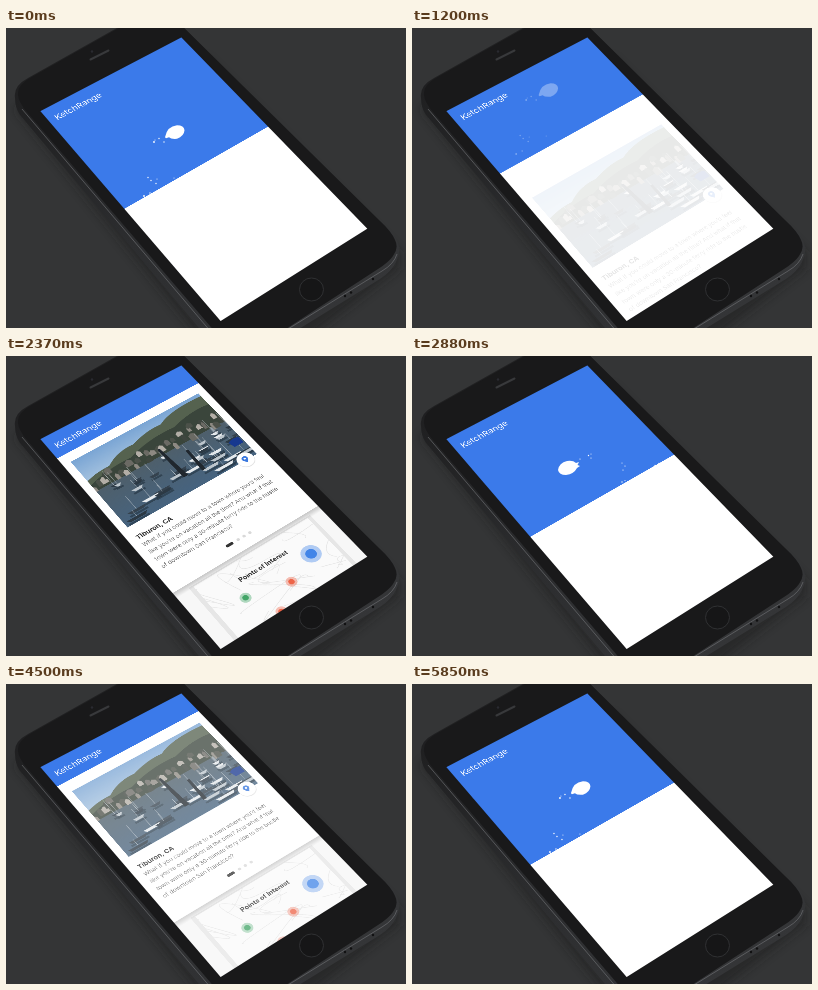
An HTML page that plays this animation: 400 px wide and 300 px high, repeating every 5.88 s.

```html
<!DOCTYPE html>
<html lang="en">
<head>
<meta charset="utf-8">
<title>KetchRange</title>
<style>
html, body { margin: 0; width: 100%; height: 100%; overflow: hidden; background: #343536; }
#stage { position: relative; width: 400px; height: 300px; overflow: hidden; }
#stage > svg { position: absolute; left: 0; top: 0; }
#screen { position: absolute; left: 0; top: 0; width: 375px; height: 667px;
  overflow: hidden; background: #fff; transform-origin: 0 0; }
#screen svg { display: block; }
text { font-family: Inter, "Open Sans", sans-serif; }
</style>
</head>
<body>
<div id="stage">
  <svg width="400" height="300" viewBox="0 0 400 300">
    <defs>
      <linearGradient id="metal" x1="0" y1="0" x2="1" y2="1">
        <stop offset="0" stop-color="#1c1c1d"/>
        <stop offset=".5" stop-color="#2c2d2f"/>
        <stop offset="1" stop-color="#37383a"/>
      </linearGradient>
      <filter id="soft"><feGaussianBlur stdDeviation="5"/></filter>
    </defs>
    <path d="M8 80L195 312H300L394 240V225L200 30Z" fill="#1d1e1f" opacity=".5" filter="url(#soft)"/>
    <g stroke="#4d4e51" stroke-width="2.4" stroke-linecap="round">
      <path d="M26 95L32 103M57 133L67 145M74 153L82 162"/>
    </g>
    <path d="M9 70Q7 58 22 50L125 -8H170L373 192Q387 204 391 213Q396 222 390 234Q386 243 374 251L275 312H203L14 87Q9 80 9 70Z" fill="url(#metal)"/>
    <path d="M12 67Q11 57 24 50L127 -8H170L373 192Q386 204 389 212Q393 220 387 228Q383 234 372 241L263 312H216L21 84Q13 75 12 67Z" fill="#19191a"/>
    <path d="M16 81L211 311M269 309L376 243Q388 236 391 226" fill="none" stroke="#77787c" stroke-width=".9" opacity=".65"/>
    <path d="M84.500 31.500L102.500 22.500" stroke="#38393b" stroke-width="2" stroke-linecap="round"/>
    <circle cx="86" cy="23.500" r="1.200" fill="#292a30"/>
    <ellipse cx="305.500" cy="261.500" rx="12" ry="11.500" fill="#161617" stroke="#303133"/>
    <g fill="#111112">
      <circle cx="339" cy="268" r="1.200"/><circle cx="345" cy="264.500" r="1.200"/>
      <circle cx="367" cy="251" r="1.200"/>
    </g>
  </svg>

  <div id="screen">
    <svg width="375" height="667" viewBox="0 0 375 667">
      <defs>
        <linearGradient id="sky" x1="0" y1="0" x2="0" y2="1">
          <stop offset="0" stop-color="#7aa5d4"/><stop offset=".35" stop-color="#a9c5e0"/>
        </linearGradient>
        <linearGradient id="water" x1="0" y1="0" x2="0" y2="1">
          <stop offset="0" stop-color="#4e5f6b"/><stop offset="1" stop-color="#46637f"/>
        </linearGradient>
        <linearGradient id="shade" x1="0" y1="0" x2="0" y2="1">
          <stop offset="0" stop-color="#000" stop-opacity=".2"/><stop offset="1" stop-color="#000" stop-opacity="0"/>
        </linearGradient>
        <clipPath id="frame"><rect width="335" height="218"/></clipPath>
        <clipPath id="mapClip"><rect x="44" y="514" width="292" height="190"/></clipPath>
      </defs>
      <g id="cards">
        <g id="map">
          <rect y="480" width="375" height="250" fill="#f7f7f7"/>
          <rect x="34" y="511" width="311" height="200" fill="#e6e6e6"/>
          <rect x="44" y="514" width="292" height="190" fill="#fafafa"/>
          <g id="roads" clip-path="url(#mapClip)" fill="none" stroke="#e6e6e6" stroke-width="1.400"></g>
          <text x="187.500" y="562" font-size="14.700" font-weight="700" text-anchor="middle" fill="#333">Points of Interest</text>
          <g id="pins"></g>
        </g>
        <g id="place">
          <rect y="502" width="375" height="15" fill="url(#shade)"/>
          <rect y="60" width="375" height="442" fill="#fff"/>
          <g transform="translate(20 94)" clip-path="url(#frame)">
            <rect width="335" height="218" fill="url(#sky)"/>
            <path d="M0 66Q30 56 60 58Q95 34 135 38Q180 22 215 26Q255 4 335 10V110H0Z" fill="#55624f"/>
            <path d="M0 80Q50 62 110 66Q170 44 235 50Q290 32 335 40V112H0Z" fill="#3a453b"/>
            <rect y="100" width="335" height="118" fill="url(#water)"/>
            <g id="town"></g>
            <g id="boats"></g>
            <path d="M168 82L174 82 182 178 170 178ZM216 120H222V186H213Z" fill="#20272e"/>
            <path d="M304 157Q318 149 332 156V174H308Z" fill="#17388f"/>
          </g>
          <circle cx="326" cy="312" r="20" fill="#000" opacity=".1"/>
          <circle cx="326" cy="310" r="19.500" fill="#fff"/>
          <path d="M326 319Q319 311 319 307A7 7 0 0 1 333 307Q333 311 326 319Z" fill="#3978df"/>
          <circle cx="326" cy="307" r="2.500" fill="#fff"/>
          <text x="20" y="351" font-size="15.200" font-weight="700" fill="#333">Tiburon, CA</text>
          <g id="copy" font-size="13.050" fill="#707070"></g>
          <rect x="155" y="469.500" width="18" height="7" rx="3.500" fill="#333"/>
          <g fill="#d9d9d9">
            <circle cx="186" cy="473" r="3.500"/><circle cx="201" cy="473" r="3.500"/><circle cx="216" cy="473" r="3.500"/>
          </g>
        </g>
      </g>
      <rect id="sea" width="375" height="328" fill="#3b7aea"/>
      <text x="17" y="45" font-size="20.500" fill="#fff">KetchRange</text>
    </svg>
  </div>

  <svg width="400" height="300" viewBox="0 0 400 300" fill="#fff">
    <polygon id="rim" fill="none" stroke="#19191a" stroke-width="1.200"/>
    <g id="sail"><g id="hull"></g><g id="spray"></g></g>
  </svg>
</div>
<script>
const LOOP = 5880, HALF = LOOP / 2;
const W = 375, H = 667;
const $ = id => document.getElementById(id);
const clamp = x => Math.max(0, Math.min(1, x));
const span = (t, from, length) => clamp((t - from) / length);
const easeOut = x => 1 - (1 - x) ** 3;
const easeBoth = x => x * x * (3 - 2 * x);

// Projects a W x H rectangle onto the tilted display.
function project([x0, y0], [x1, y1], [x2, y2], [x3, y3]) {
  const ax = x1 - x2, ay = y1 - y2, bx = x3 - x2, by = y3 - y2;
  const sx = x0 - x1 + x2 - x3, sy = y0 - y1 + y2 - y3;
  const det = ax * by - bx * ay;
  const g = (sx * by - bx * sy) / det, h = (ax * sy - sx * ay) / det;
  return `matrix3d(${[
    (x1 - x0 + g * x1) / W, (y1 - y0 + g * y1) / W, 0, g / W,
    (x3 - x0 + h * x3) / H, (y3 - y0 + h * y3) / H, 0, h / H,
    0, 0, 1, 0, x0, y0, 0, 1].map(n => n.toFixed(9))})`;
}
const corners = [[33.4, 83], [175.4, 8.6], [362.3, 200.8], [214.6, 293.8]];
$("screen").style.transform = project(...corners);
$("rim").setAttribute("points", corners.join(" "));

let seed = 7;
const rnd = (lo, hi) => {
  seed = (seed * 16807) % 2147483647;
  return lo + (hi - lo) * seed / 2147483647;
};
const repeat = (n, make) => Array.from({ length: n }, (_, i) => make(i)).join("");

$("copy").innerHTML = [
  "What if you could move to a town where you’d feel",
  "like you’re on vacation all the time? And what if that",
  "town were only a 30-minute ferry ride to the bustle",
  "of downtown San Francisco?"
].map((line, i) => `<text x="20" y="${373 + i * 22.7}">${line}</text>`).join("");

$("town").innerHTML = repeat(34, i => {
  const x = i * 10 + rnd(-5, 5), y = rnd(62, 94), w = rnd(8, 18);
  const tone = ["#8d8982", "#4c5149", "#b3aea6", "#3f463f", "#6b6a64"][i % 5];
  return `<path d="M${x} ${y}l${w / 2} -5 ${w / 2} 5v${rnd(8, 18)}h${-w}Z" fill="${tone}"/>`;
});
$("boats").innerHTML = repeat(38, i => {
  const x = rnd(-5, 325), y = 104 + (i * 2.7) % 100, w = 14 + (y - 100) * .35;
  const tone = ["#e6eaed", "#2c3944", "#bcc5cc", "#35424e"][i % 4];
  return `<path d="M${x} ${y}h${w}l-6 7h${12 - w}Z" fill="${tone}"/>` +
    `<path d="M${x + w / 2} ${y}v${-rnd(14, 50)}" stroke="#c9d1d7" stroke-width=".8"/>` +
    `<path d="M${x} ${y + 11}h${w}" stroke="#22323f" stroke-width="5" opacity=".6"/>`;
});
$("roads").innerHTML = repeat(18, () => {
  const x = rnd(20, 340), y = rnd(505, 680);
  return `<path d="M${x} ${y}q${rnd(-40, 40)} ${rnd(-30, 30)} ${rnd(-90, 90)} ${rnd(-50, 50)}t${rnd(-60, 60)} ${rnd(-40, 40)}"/>`;
});
$("pins").innerHTML = [
  [285, 591, 22, "#4285e8"], [210, 622, 12, "#ee6548"],
  [112, 598, 12, "#42a567"], [150, 667, 12, "#ee6548"]
].map(([x, y, r, c]) =>
  `<circle cx="${x}" cy="${y}" r="${r}" fill="${c}" opacity=".4"/>` +
  `<circle cx="${x}" cy="${y}" r="${r * .55}" fill="${c}"/>`).join("");

// Hull paths are centred on the boat; spray points are on the stage.
const scenes = [
  {
    at: [169, 104.3], drift: 2 / 840, from: 0,
    hull: "M-10 5Q-8 -6 2 -7Q9 -7 9.500 -2Q9 4 2 6.500Q-4 7 -6 5L-9 6Z",
    spray: [[148, 114, .9], [153, 110.500, .7], [158, 114, .7], [149, 112, .5], [142, 149.500, .7],
      [145, 152.500, .7], [150, 155.500, .7], [151, 151, .5], [168, 150, .5], [138, 168, .9], [144, 165, .7]]
  },
  {
    at: [156, 112], drift: 5 / 810, from: 2880,
    hull: "M-10 2Q-9 -5 -1 -7Q5 -8 8 -5L11 -6 9.500 -3 12 -2 9 0Q6 6 -2 7Q-9 7 -10 2Z",
    spray: [[168, 103, .6], [176.500, 99.500, .7], [179, 102, .6], [179, 98, .5], [210, 107, .5],
      [213, 110, .6], [211, 114, .6], [210, 126, .7], [213, 124.500, .5], [243, 109.500, .7], [247, 107.500, .8]]
  }
];
scenes.forEach(s => {
  s.dots = s.spray.map(([x, y, r]) => `<circle cx="${x}" cy="${y}" r="${r}"/>`).join("");
});

let shown;
function drawBoat(t, open) {
  const second = t >= 2000 && t < 4940;
  const scene = scenes[+second];
  if (shown !== scene) {
    shown = scene;
    $("hull").innerHTML = `<path d="${scene.hull}"/>`;
    $("spray").innerHTML = scene.dots;
  }
  const age = (!second && t > HALF ? t - LOOP : t) - scene.from;
  const dx = age * scene.drift, dy = second ? -dx * .7 : Math.sin(age / 270) * .3;
  const [x, y] = scene.at;
  $("hull").setAttribute("transform", `translate(${x + dx} ${y + dy})`);
  $("spray").setAttribute("transform", `translate(${dx * .5} ${dy * .5})`);
  $("sail").setAttribute("transform", `translate(${-80 * open} ${-95 * open})`);
  $("sail").setAttribute("opacity", clamp(1 - 1.5 * open));
}

function draw(t) {
  const part = t < HALF ? 0 : 1, local = t - part * HALF;
  const leave = part ? 2320 : 2380;
  const enter = span(local, 1140, 560), exit = span(local, leave, 460);
  const open = easeOut(span(local, 1120, 460)) * (1 - easeBoth(exit));
  const rise = 300 * ((1 - enter) ** 3 + exit ** 3);

  $("place").setAttribute("transform", `translate(0 ${rise})`);
  $("map").setAttribute("transform", `translate(0 ${rise * 1.3})`);
  $("cards").setAttribute("opacity", enter * (1 - easeBoth(exit)));
  $("sea").setAttribute("height", 328 - 259 * open);
  drawBoat(t, open);
}

const start = performance.now();
function tick() {
  draw((performance.now() - start) % LOOP);
  requestAnimationFrame(tick);
}
tick();
</script>
</body>
</html>
```
